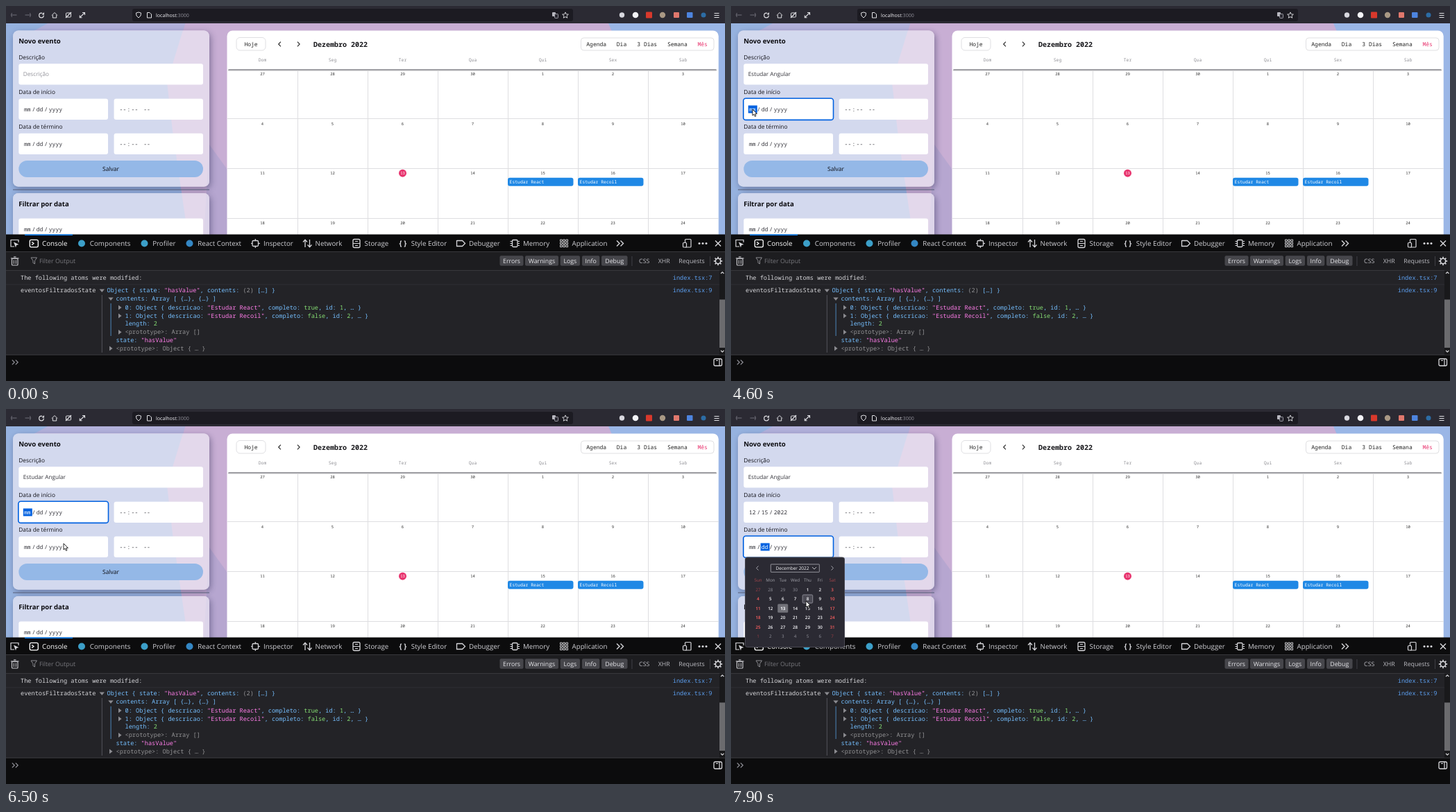
Recreate the animation shown at these times as an HTML page with a canvas. Size 1036 px wide and 541 px high, loop 8000 ms.

```html
<!DOCTYPE html>
<html lang="pt">
<head>
<meta charset="utf-8">
<title>Calendário</title>
<style>
html, body { margin: 0; width: 100%; height: 100%; overflow: hidden; background: #0c0c0d; }
canvas { display: block; width: 1036px; height: 541px; }
</style>
</head>
<body>
<canvas id="stage" width="1036" height="541"></canvas>
<script>
const ctx = document.getElementById('stage').getContext('2d');
const SANS = '"Open Sans", "Noto Sans", sans-serif';
const MONO = '"Noto Sans Mono", "DejaVu Sans Mono", monospace';
const LOOP = 8000, STEP = 100;
const BLUE = '#0061e0', LIGHT = '#e2e2e6', PINK = '#e8356f';

// ---- helpers ----
function rect(x, y, w, h, fill, r = 0, stroke, lw = 1) {
  ctx.beginPath();
  ctx.roundRect(x, y, w, h, r);
  if (fill) { ctx.fillStyle = fill; ctx.fill(); }
  if (stroke) { ctx.strokeStyle = stroke; ctx.lineWidth = lw; ctx.stroke(); }
}
function dot(x, y, r, fill, stroke, lw = 1) {
  ctx.beginPath();
  ctx.arc(x, y, r, 0, 7);
  if (fill) { ctx.fillStyle = fill; ctx.fill(); }
  if (stroke) { ctx.strokeStyle = stroke; ctx.lineWidth = lw; ctx.stroke(); }
}
function path(pts, stroke, lw = 1, fill) {
  ctx.beginPath();
  for (let i = 0; i < pts.length; i += 2) ctx.lineTo(pts[i], pts[i + 1]);
  if (fill) { ctx.closePath(); ctx.fillStyle = fill; ctx.fill(); }
  if (stroke) { ctx.strokeStyle = stroke; ctx.lineWidth = lw; ctx.stroke(); }
}
// y is the middle of the capital letters
function text(s, x, y, size, color, { font = SANS, align = 'left', weight = 400 } = {}) {
  ctx.font = `${weight} ${size}px ${font}`;
  ctx.textAlign = align;
  ctx.fillStyle = color;
  ctx.fillText(s, x, y + size * 0.35);
  return ctx.measureText(s).width;
}
const mono = (s, x, y, size, color, align = 'center', weight = 400) =>
  text(s, x, y, size, color, { font: MONO, align, weight });
const mid = (s, x, y, size, color, weight = 400) =>
  text(s, x, y, size, color, { align: 'center', weight });
const chevron = (x, y, dx, dy, color, lw = 1) =>
  path(dx ? [x - dx, y - dy, x + dx, y, x - dx, y + dy] : [x - 3, y - dy, x, y + dy, x + 3, y - dy], color, lw);

// ---- timeline ----
const CURSOR = [
  [0], [100, 82, 82], [200, 86, 67], [300, 84, 75], [800],
  [4200, 120, 231], [4300, 88, 200], [4400, 50, 168], [4500, 31, 149],
  [4800, 44, 158], [4900, 64, 174], [5000, 88, 207], [5200, 90, 219], [5300, 91, 228],
  [5500, 97, 229], [5600, 101, 232], [5700, 105, 236], [5800, 107, 239], [5900, 108, 241],
  [6500, 83, 194], [6600, 79, 195], [6700, 70, 196],
  [6900, 62, 198], [7000, 55, 199], [7100, 50, 200], [7200, 49, 201],
  [7400, 62, 211], [7500, 86, 229], [7600, 96, 251], [7700, 103, 264], [7800, 107, 272], [7900, 108, 277]
];
const PHRASE = 'Estudar Angular';
const KEYS = [1300, 1600, 1700, 1800, 2200, 2300, 2400, 2500, 2700, 3000, 3100, 3200, 3500, 3500, 3600];

function stateAt(t) {
  const [, x, y] = CURSOR.filter(k => k[0] <= t).pop();
  const typed = PHRASE.slice(0, KEYS.filter(k => k <= t).length);
  const second = t >= 7100;
  const open = t >= 4800 && t < 6500 ? t - 4800 : t >= 7400 ? t - 7400 : -1;
  const alpha = open < 0 ? 0 : open >= 200 ? 1 : second ? [0.25, 0.67][open / STEP] : [0.5, 1][open / STEP];
  return {
    x, y, typed, second, alpha,
    focus: t < 800 ? '' : t < 4600 ? 'name' : second ? 'end' : 'start',
    caret: t >= 1300 && t < 4000,
    start: t >= 6600 ? ['12', '15', '2022'] : ['mm', 'dd', 'yyyy']
  };
}

// ---- browser bar ----
function browserBar() {
  rect(0, 0, 1036, 25, '#2b2a33');
  rect(182, 4, 635, 18, '#1c1b22', 3);
  const arrow = (x, d, c) => {
    path([x - 4, 13, x + 4, 13], c);
    path([x + d, 10, x + d * 4 / 3, 13, x + d, 16], c);
  };
  arrow(11.5, -3, '#6f6e78');
  arrow(31.5, 3, '#6f6e78');
  ctx.beginPath(); ctx.arc(51, 13.5, 3.3, 0, 5.2);
  ctx.strokeStyle = LIGHT; ctx.lineWidth = 1.2; ctx.stroke();
  path([55, 9, 55, 12.5, 51.5, 12.5], 0, 0, LIGHT);
  path([66, 13.5, 70, 9.5, 74, 13.5], LIGHT);
  path([67.3, 13, 67.3, 17, 72.7, 17, 72.7, 13], LIGHT);
  rect(86.5, 10, 7, 6, null, 1, LIGHT);
  path([86, 17, 94, 9], LIGHT, 1.2);
  path([106.5, 16.5, 113, 10], LIGHT, 1.1);
  path([110, 9.5, 113.5, 9.5, 113.5, 13], LIGHT, 1.1);
  path([106.3, 13.5, 106.3, 16.7, 109.5, 16.7], LIGHT, 1.1);
  path([187.5, 10, 191, 9, 194.5, 10, 194, 14, 191, 17, 188, 14, 187.5, 10], LIGHT);
  path([203.5, 9.5, 207, 9.5, 209.5, 12, 209.5, 17, 203.5, 17, 203.5, 9.5], LIGHT);
  const w = text('localhost', 216, 13.5, 7.1, '#f4f4f8');
  text(':3000', 216 + w, 13.5, 7.1, '#92919b');
  rect(787, 9, 5, 6, '#b8b8c0', 1);
  rect(790.5, 11.5, 5, 6, '#2b2a33', 1, '#b8b8c0', 0.8);
  const star = [];
  for (let i = 0; i <= 10; i++) {
    const a = i * Math.PI / 5 - Math.PI / 2, r = i % 2 ? 2.1 : 4.6;
    star.push(806 + r * Math.cos(a), 13.5 + r * Math.sin(a));
  }
  path(star, LIGHT, 0.9);
  dot(887.5, 13, 3.7, '#d8d8df');
  dot(907, 13, 4.3, '#f4f4f8');
  rect(922, 8.5, 9, 9, '#d8392c', 1);
  dot(946, 13, 4.2, '#a99884');
  rect(962, 9, 8, 8, '#e0786d', 1);
  rect(981, 9, 8.5, 8, '#4d84df', 1);
  dot(1005, 13, 3.5, '#2c6ca5');
  for (const y of [10.5, 13.5, 16.5]) path([1020.5, y, 1027.5, y], LIGHT);
}

// ---- page ----
function backdrop() {
  rect(0, 25, 1036, 306, '#c8aed4');
  path([868, 25, 1036, 25, 1036, 331, 1000, 331], 0, 0, '#9ab6e6');
  path([0, 25, 258, 25, 232, 110, 240, 180, 262, 331, 0, 331], 0, 0, '#96b2df');
  path([60, 25, 258, 25, 255, 36, 40, 36], 0, 0, '#b2b1db');
  path([293, 200, 319, 236, 319, 331, 285, 331], 0, 0, '#b6a6d0');
}
function panel(y, h) {
  ctx.save();
  ctx.beginPath();
  ctx.rect(0, 25, 319, 306);
  ctx.roundRect(10, y, 283, h, 8);
  ctx.clip('evenodd');
  ctx.shadowColor = 'rgba(40,40,80,.45)';
  ctx.shadowBlur = 10;
  ctx.shadowOffsetX = 2;
  ctx.shadowOffsetY = 3;
  rect(10, y, 283, h, '#fff', 8);
  ctx.restore();
  rect(10, y, 283, h, 'rgba(240,236,246,.68)', 8);
}
function dateText(parts, y, sel = -1) {
  const xs = [26, 43.8, 61.8];
  parts.forEach((p, i) => {
    if (i === sel) rect(xs[i] - 1.2, y - 5.5, 13, 11, BLUE);
    mono(p, xs[i], y, 8, i === sel ? '#fff' : '#33333a', 'left');
  });
  mono('/', 40, y, 8, '#33333a');
  mono('/', 57.7, y, 8, '#33333a');
}
function timeText(y) {
  for (const x of [163.6, 180.6, 198.2]) mono('--', x, y, 8, '#33333a', 'left');
  mono(':', 177, y, 8, '#33333a');
}
function field(x, y, w, on) {
  rect(x, y, w, 30.2, '#fff', 3);
  if (on) rect(x - 0.5, y - 0.5, w + 1, 31.2, null, 3.5, BLUE, 1.6);
}
function form(s) {
  panel(35.5, 225);
  text('Novo evento', 18.3, 51, 9.6, '#09090d', { weight: 700 });
  text('Descrição', 18.3, 74, 8.3, '#111117');
  field(18.3, 83.3, 265.7, s.focus === 'name');
  if (s.typed) {
    const w = text(s.typed, 24.8, 98.5, 8.2, '#33333a');
    if (s.caret) rect(Math.round(24.8 + w), 93.5, 0.9, 10, '#111');
  } else text('Descrição', 24.8, 98.5, 8.2, '#92929a');
  const blank = ['mm', 'dd', 'yyyy'];
  [['Data de início', 124.5, 'start', s.start, 0], ['Data de término', 174.5, 'end', blank, 1]]
    .forEach(([label, y, id, parts, sel]) => {
      text(label, 18.3, y, 8.3, '#111117');
      field(18.3, y + 9.2, 128.7, s.focus === id);
      field(155.6, y + 9.2, 128.4);
      dateText(parts, y + 24.5, s.focus === id ? sel : -1);
      timeText(y + 24.5);
    });
  rect(18.3, 223, 265.7, 24, '#94b8e7', 12);
  mid('Salvar', 151, 235.5, 8.5, '#0c0c12');
  panel(270, 80);
  rect(10, 264.6, 283, 1, '#565e78');
  text('Filtrar por data', 18.3, 286, 9.55, '#09090d', { weight: 700 });
  field(18.3, 306.4, 265.7);
  dateText(blank, 322);
}
function calendar() {
  rect(318.5, 35.5, 708.2, 310, '#fff', 8);
  rect(332, 45.5, 42, 18.5, null, 5, '#dcdcdf', 0.9);
  mono('Hoje', 353, 55.3, 8, '#222');
  chevron(394.3, 55, -1.6, 3.4, '#333', 1.2);
  chevron(421.5, 55, 1.6, 3.4, '#333', 1.2);
  mono('Dezembro 2022', 443, 55, 10, '#16161a', 'left', 600);
  rect(828.5, 46, 191.5, 18, null, 4, '#dcdcdf', 0.9);
  [['Agenda', 850.7], ['Dia', 887], ['3 Dias', 923.7], ['Semana', 967.3], ['Mês', 1003.7]]
    .forEach(([s, x]) => mono(s, x, 55.3, 8, s === 'Mês' ? PINK : '#222'));
  const edge = i => 319 + i * 101, center = i => edge(i) + 50.5;
  ['Dom', 'Seg', 'Ter', 'Qua', 'Qui', 'Sex', 'Sab'].forEach((d, i) => mono(d, center(i), 78, 6.4, '#909096'));
  for (let i = 1; i < 7; i++) rect(edge(i), 93, 1, 238, '#dedee1');
  const g = ctx.createLinearGradient(0, 91, 0, 94);
  g.addColorStop(0, '#9a9a9f'); g.addColorStop(0.4, '#9a9a9f'); g.addColorStop(1, '#f4f4f4');
  rect(320, 91, 704, 3, g, 1.5);
  for (let r = 0; r < 4; r++) {
    const y = 98 + r * 71.7;
    if (r) rect(319, Math.round(y - 7.4), 708, 1, '#dedee1');
    for (let c = 0; c < 7; c++) {
      const n = (r * 7 + c + 26) % 30 + 1, today = n === 13;
      if (today) dot(center(c), 241.2, 5.5, PINK);
      mono(n, center(c), y, 5.6, today ? '#fff' : '#333');
    }
  }
  [['Estudar React', edge(4)], ['Estudar Recoil', edge(5)]].forEach(([s, x]) => {
    rect(x, 247.7, 94.5, 12, '#1f88e5', 3);
    mono(s, x + 2.6, 254, 6.4, '#fff', 'left');
  });
}

// ---- developer tools ----
const INK = { w: '#d7d7db', b: '#75bfff', p: '#ff7de9', g: '#86de74', d: '#939395' };
// alternating colour key and text, parted by "|"
function rich(x, y, line) {
  const p = line.split('|');
  for (let i = 0; i < p.length; i += 2) x += mono(p[i + 1], x, y - 0.5, 8.6, INK[p[i]], 'left');
}
function twisty(x, y, open) {
  path(open ? [x - 3.7, y - 2, x + 3.7, y - 2, x, y + 2.6] : [x - 2, y - 3.4, x + 2.6, y, x - 2, y + 3.4], 0, 0, '#8b8b90');
}
function toolIcons() {
  const y = 342.5, c = '#d7d7db';
  path([12, 347, 7, 347, 7, 337.5, 18, 337.5, 18, 341], c, 1.2);
  path([11, 340.5, 18.5, 344, 15, 345, 14, 348.5], 0, 0, c);
  rect(34.3, 337.3, 12, 10.5, null, 2, '#fff', 1.3);
  chevron(38.5, y, 1.5, 2.3, '#fff', 1.2);
  dot(109, y, 5, '#3c9fc8');
  dot(199.5, y, 5, '#3c9fc8');
  dot(264.5, y, 5, '#3487c4');
  rect(355, 338.5, 8.5, 8, null, 1.5, c, 1.3);
  path([353, y, 355, y], c, 1.2); path([363.5, y, 366, y], c, 1.2);
  path([359.3, 336, 359.3, 338.5], c, 1.2); path([359.3, 346.5, 359.3, 349], c, 1.2);
  path([431, 348, 431, 337.5], c, 1.3); path([428, 340.5, 431, 337.3, 434, 340.5], c, 1.3);
  path([437.5, 337, 437.5, 347.5], c, 1.3); path([434.5, 344.5, 437.5, 347.7, 440.5, 344.5], c, 1.3);
  rect(500, 336.5, 10, 12, null, 2, c, 1.3);
  path([500, y, 510, y], c); path([503, 339.5, 507, 339.5], c); path([503, 345.5, 507, 345.5], c);
  mono('{', 568.5, y, 10.5, c, 'center', 600);
  mono('}', 575.5, y, 10.5, c, 'center', 600);
  path([649.5, 338.5, 657.5, 338.5, 661.5, y, 657.5, 346.5, 649.5, 346.5, 649.5, 337.9], c, 1.3);
  rect(729.5, 337.5, 7.5, 10, null, 1.5, c, 1.3);
  for (const d of [-3, 0, 3]) { path([726.5, y + d, 729, y + d], c); path([737.5, y + d, 740, y + d], c); }
  for (let i = 0; i < 9; i++) rect(798.5 + i % 3 * 4.2, 337 + Math.floor(i / 3) * 4, 2.7, 2.7, null, 0, c, 0.9);
  chevron(882, y, 2, 4, c, 1.4); chevron(887.5, y, 2, 4, c, 1.4);
  rect(978.5, 336.5, 8.5, 11.5, null, 1, c, 1.2);
  rect(975.5, 341.5, 5, 6.5, '#0c0c0d', 1, c, 1.2);
  for (const x of [999, 1004, 1009]) dot(x, y, 1.5, c);
  path([1022, 338.5, 1030, 346.5], c, 1.4); path([1030, 338.5, 1022, 346.5], c, 1.4);
}
function devtools() {
  rect(0, 329.5, 1036, 211.5, '#0c0c0d');
  rect(27, 329.6, 69, 1.4, '#0a84ff');
  rect(0, 354.5, 1036, 149, '#232327');
  rect(0, 354.5, 1036, 26.5, '#1d1d20');
  rect(0, 354, 1036, 0.9, '#38383d');
  toolIcons();
  [['Console', 52], ['Components', 120.8], ['Profiler', 211.2], ['React Context', 276.2], ['Inspector', 371],
   ['Network', 445.6], ['Storage', 516.6], ['Style Editor', 583.8], ['Debugger', 667], ['Memory', 745], ['Application', 815.5]]
    .forEach(([s, x], i) => text(s, x, 342.7, 9.75, i ? '#d0d0d5' : '#fff'));
  rect(8.5, 364.5, 8.5, 9.5, null, 1, '#c5c5ca', 1.2);
  path([7, 364, 18.5, 364], '#c5c5ca', 1.2);
  path([11, 362, 14.5, 362], '#c5c5ca', 1.2);
  path([11.3, 366.5, 11.3, 372], '#c5c5ca'); path([14.3, 366.5, 14.3, 372], '#c5c5ca');
  path([36, 363, 44.5, 363, 41.5, 367.5, 41.5, 372, 39, 370.5, 39, 367.5, 36, 363], '#8b8b90');
  text('Filter Output', 48, 368, 8.8, '#78787d');
  [['Errors', 711.5, 34], ['Warnings', 748, 48], ['Logs', 798.7, 28.3], ['Info', 830, 25.3], ['Debug', 858, 37.5]]
    .forEach(([s, x, w]) => {
      rect(x, 360.3, w, 14.5, '#46464b', 2);
      mid(s, x + w / 2, 368, 8.8, '#e6e6ea');
    });
  rect(901.5, 361, 0.9, 14, '#45454a');
  rect(1014, 361, 0.9, 14, '#45454a');
  [['CSS', 919.7], ['XHR', 948.3], ['Requests', 988]].forEach(([s, x]) => mid(s, x, 368, 8.8, '#bcbcc2'));
  for (let i = 0; i < 8; i++) {
    const a = i * Math.PI / 4, u = Math.cos(a), v = Math.sin(a);
    path([1026 + 4 * u, 368 + 4 * v, 1026 + 6.2 * u, 368 + 6.2 * v], '#d7d7db', 1.6);
  }
  dot(1026, 368, 3.7, null, '#d7d7db', 1.6);

  rect(0, 381, 1036, 0.9, '#38383d');
  rect(0, 401.5, 1028, 0.8, '#333338');
  rect(0, 502.8, 1036, 0.9, '#38383d');
  rich(21, 392.5, 'w|The following atoms were modified:');
  mono('index.tsx:7', 1017.5, 392, 8.6, '#5c9ff0', 'right');
  mono('index.tsx:9', 1017.5, 410, 8.6, '#5c9ff0', 'right');
  rich(21, 410.5, 'w|eventosFiltradosState');
  rect(137.8, 417, 1, 83, '#55555b');
  rect(150.6, 429, 1, 47, '#4d86bb');
  twisty(138.3, 410.5, true);
  twisty(151, 422.5, true);
  for (const y of [435, 447, 470.5]) twisty(164, y);
  twisty(151, 494);
  rich(145.5, 410.5, 'b|Object { state: |p|"hasValue"|b|, contents: |d|(2)|b| […] }');
  rich(158.5, 422.5, 'b|contents: Array [ {…}, {…} ]');
  [['React', 'true'], ['Recoil', 'false']].forEach(([s, done], i) =>
    rich(171.5, 435 + 12 * i, `b|${i}: Object { descricao: |p|"Estudar ${s}"|b|, completo: |g|${done}|b|, id: |g|${i + 1}|b|, … }`));
  rich(171.5, 458.7, 'b|length: |g|2');
  rich(171.5, 470.5, 'd|<prototype>: Array []');
  rich(158.5, 482.5, 'b|state: |p|"hasValue"');
  rich(158.5, 494, 'd|<prototype>: Object { … }');

  rect(1028, 381.5, 8, 121.5, '#19191b');
  rect(1028, 423.5, 8, 69.5, '#6b6b6e');
  path([1030, 386, 1032.2, 383.8, 1034.4, 386], '#d7d7db', 1.2);
  path([1030, 497, 1032.2, 499.2, 1034.4, 497], '#d7d7db', 1.2);
  chevron(10.5, 514, 1.7, 3.4, '#94949c', 1.2);
  chevron(15.5, 514, 1.7, 3.4, '#94949c', 1.2);
  rect(1020, 509, 11.5, 10, null, 2, '#d7d7db', 1.3);
  path([1028, 509, 1028, 519], '#d7d7db', 1.2);
  path([1023, 511.5, 1026, 511.5], '#d7d7db');
}

// ---- date picker ----
function picker(s) {
  ctx.save();
  ctx.globalAlpha = s.alpha;
  const top = s.second ? 50 : 0;
  ctx.translate(0, top);
  rect(20.5, 164, 143, 129.5, '#2b2a33', 3, '#4b4a54', 1);
  chevron(38, 179.5, -1.5, 3, '#a6a6ae');
  chevron(146, 179.5, 1.5, 3, '#a6a6ae');
  rect(57.3, 174, 70, 11.3, null, 0.5, '#a0a0a8', 0.9);
  text('December 2022', 64.5, 179.8, 6.5, '#fbfbfe');
  chevron(120, 179.6, 0, 1.5, '#d7d7db', 0.9);
  const colX = c => 39 + 17.85 * c, rowY = r => 210.5 + 13.5 * r;
  ['Sun', 'Mon', 'Tue', 'Wed', 'Thu', 'Fri', 'Sat'].forEach((d, c) =>
    mid(d, colX(c), 197, 6.2, c % 6 ? '#a2a2aa' : '#a8474d'));
  const hc = Math.round((s.x - 39) / 17.85), hr = Math.round((s.y - top - 210.5) / 13.5);
  for (let i = 0; i < 42; i++) {
    const c = i % 7, r = Math.floor(i / 7), x = colX(c), y = rowY(r);
    const day = i - 3, other = day < 1 || day > 31;
    const today = day === 13;
    if (today) rect(x - 7.5, y - 6.3, 15, 12.6, '#727279', 1.5);
    else if (c === hc && r === hr) rect(x - 7.3, y - 6, 14.6, 12, '#4b4a54', 1.5, '#92929c', 0.9);
    const color = c % 6 ? (other ? '#92929b' : '#fbfbfe') : (other ? '#a03f46' : '#ff6060');
    mid(day < 1 ? day + 30 : day > 31 ? day - 31 : day, x, y, 6.2, color, today ? 700 : other ? 400 : 600);
  }
  ctx.restore();
}
function pointer(x, y) {
  const shape = [0, 0, 0, 9, 2, 7.2, 3.5, 10.4, 5, 9.7, 3.6, 6.7, 6.4, 6.5, 0, 0];
  path(shape.map((v, i) => v + (i % 2 ? y : x)), '#111', 0.9, '#fff');
}

function draw(t) {
  const s = stateAt(t);
  ctx.textRendering = 'geometricPrecision';
  backdrop();
  form(s);
  calendar();
  browserBar();
  devtools();
  if (s.alpha) picker(s);
  if (s.x) pointer(s.x, s.y);
}

const began = performance.now();
let last = -1;
function tick() {
  const t = Math.floor((performance.now() - began) % LOOP / STEP) * STEP;
  if (t !== last) draw(last = t);
  requestAnimationFrame(tick);
}
tick();
</script>
</body>
</html>
```
